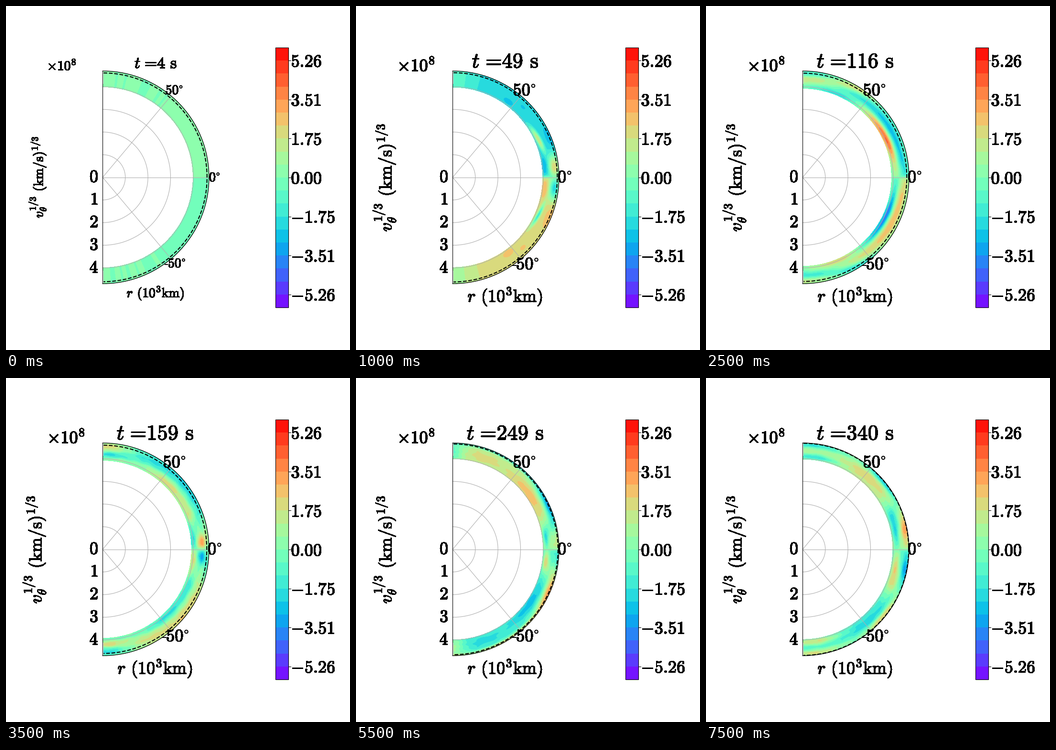
Recreate the animation shown at these times as a matplotlib script. Size 720 by 720 pixels, loop 8000 ms.

```python
import numpy as np
import matplotlib.pyplot as plt
from matplotlib.animation import FuncAnimation
from matplotlib.patches import Circle, Rectangle
from matplotlib.patheffects import withStroke

plt.rcParams["mathtext.fontset"] = "cm"

FRAMES, INTERVAL = 16, 500
CX, CY, R, UNIT = 202.3, 358.6, 222.6, 47.4
VMAX, BANDS = 5.847, 20
LEVELS = np.linspace(-VMAX, VMAX, BANDS + 1)
THIN = 1.1

# dpi 72 makes one point equal one pixel
fig = plt.figure(figsize=(10, 10), dpi=72, facecolor="white")
ax = fig.add_axes([0, 0, 1, 1])
ax.set_xlim(0, 720)
ax.set_ylim(720, 0)
ax.axis("off")

# Shell grid: latitude in degrees, depth 0 (inner edge) to 1 (rim)
lat, S = np.meshgrid(np.linspace(-89.5, 89.5, 480), np.linspace(0, 1, 60))
A = np.abs(lat)
SIDE = np.tanh(lat / 1.3)


def polar(r, deg):
    a = np.radians(deg)
    return CX + r * np.cos(a), CY - r * np.sin(a)


def bump(a, s, da, ds, tilt=0):
    return np.exp(-((A - a) / da) ** 2 - ((S - s - tilt * (A - a)) / ds) ** 2)


def stripe(a, w):
    return np.exp(-((A - a) / w) ** 2)


def filaments(phase):
    return 0.3 * np.sin(0.45 * A + 9 * S + phase) * np.sin(14 * S - 0.2 * A + 2 * phase)


def onset():
    north = 0.25 - 0.5 * (stripe(82, 1) + stripe(77, 1) + stripe(65, 3.5)
                          + stripe(56, 1.3) + stripe(52, 1))
    south = -0.25 + 0.5 * (stripe(89, 4) + stripe(81, 1.6) + stripe(77, 1.2)
                           + stripe(72, 2) + stripe(67, 1.8) + stripe(57, 1.3))
    return np.where(lat > 0, north, south) * np.abs(SIDE)


def inflow():
    v = -2.05 + 1.2 * stripe(90, 13)
    v = v - 0.6 * bump(53.7, 0.25, 4, 0.2) - 0.6 * bump(45, 0.57, 2, 0.12)
    v += 3.8 * bump(24, 0.22, 8, 0.13, -0.01) - 0.6 * bump(22, 0.85, 8, 0.25)
    v += 4.2 * bump(6, 0.75, 7, 0.34) - 1.0 * bump(7, 0.2, 6, 0.2)
    return v * SIDE


def jets():
    v = -3.5 * bump(28, 0.6, 42, 0.27, -0.005) - 1.6 * bump(5, 0.65, 7, 0.3)
    v += 3.0 * bump(90, 0.43, 20, 0.22) + 3.8 * bump(60, 0.85, 17, 0.22, -0.014)
    v += 5.6 * bump(25, 0.16, 24, 0.2, -0.003) - 3.0 * bump(88, 0.85, 15, 0.17)
    v += -3.4 * bump(65, 0.08, 19, 0.15)
    return v * SIDE


def breakup():
    v = -0.7 + 2.9 * bump(88, 0.78, 15, 0.25) - 1.6 * bump(86, 0.35, 9, 0.14)
    v += 1.0 * bump(80, 0.08, 15, 0.12) - 1.2 * bump(62, 0.6, 16, 0.3)
    v += 2.8 * bump(45, 0.2, 20, 0.28) + 1.7 * bump(22, 0.25, 9, 0.25)
    v += -1.5 * bump(35, 0.9, 24, 0.3) - 1.4 * bump(8, 0.15, 9, 0.2)
    v += 3.9 * bump(4, 0.6, 6, 0.28) + 1.8 * bump(12, 0.95, 8, 0.2)
    return (v + filaments(0)) * SIDE


def rebound():
    v = 1.2 - 3.1 * bump(87, 0.25, 5, 0.13) - 3.2 * bump(74, 0.88, 8, 0.14)
    v += 0.8 * bump(72, 0.3, 9, 0.25) - 3.4 * bump(60, 0.48, 6.5, 0.16, -0.01)
    v += 1.7 * bump(30, 0.28, 16, 0.3) - 4.2 * bump(30, 0.9, 24, 0.33)
    v += -4.3 * bump(7, 0.3, 8, 0.25, 0.02) + 3.6 * bump(8, 0.8, 6, 0.25)
    return (v + 0.6 * filaments(1)) * SIDE


def settling():
    v = 1.3 - 2.0 * bump(90, 0.5, 7, 0.8) + 0.8 * bump(72, 0.4, 11, 0.3)
    v += -3.5 * bump(55, 1, 34, 0.14) + 1.5 * bump(36, 0.25, 16, 0.3)
    v += -3.7 * bump(24, 0.85, 13, 0.25) - 3.2 * bump(7, 0.22, 7, 0.2)
    v += 1.0 * bump(5, 0.95, 5, 0.2) - 1.3 * bump(13, 0.5, 6, 0.3)
    return (v + 0.6 * filaments(2)) * SIDE


def late():
    v = 1.1 - 2.9 * bump(84, 0.88, 20, 0.2) - 2.9 * bump(82, 0.18, 15, 0.2)
    v += 1.1 * bump(46, 0.5, 17, 0.4, -0.008) - 3.8 * bump(40, 0.92, 14, 0.22)
    v += -2.8 * bump(20, 0.35, 9, 0.4) - 2.6 * bump(8, 0.25, 9, 0.22)
    v += 2.4 * bump(12, 0.85, 8, 0.22)
    return (v + 0.7 * filaments(3)) * SIDE


# State of the shell at the key steps
KEYS = [0, 2, 4, 7, 9, 11, 15]
SECONDS = [4, 49, 94, 159, 205, 249, 340]
INNER = [189, 188.5, 186, 186, 188.5, 189.3, 188.5]
DASH = [218.5, 219, 218, 218, 219, 220.5, 222]
FIELDS = [f() for f in (onset, inflow, jets, breakup, rebound, settling, late)]


def field(i):
    k = min(np.searchsorted(KEYS, i, side="right") - 1, len(KEYS) - 2)
    w = (i - KEYS[k]) / (KEYS[k + 1] - KEYS[k])
    return (1 - w) * FIELDS[k] + w * FIELDS[k + 1]


def label(x, y, s, size=36.3, **kw):
    return ax.text(x, y, s, size=size, va="baseline", zorder=4, antialiased=False,
                   path_effects=[withStroke(linewidth=0.5, foreground="black")], **kw)


# Polar grid and frame
half = np.linspace(90, -90, 361)
for k in range(1, 5):
    ax.plot(*polar(UNIT * k, half), color="#b0b0b0", lw=THIN, zorder=1.5)
for a in (-50, 0, 50):
    ax.plot(*polar(np.array([0, R]), a), color="#b0b0b0", lw=THIN, zorder=1.5)
ax.plot(*polar(R, half), color="black", lw=1.3, zorder=3)
ax.plot([CX, CX], [CY - R, CY + R], color="black", lw=THIN, zorder=3)
for k in range(5):
    label(193.5, 368.3 + UNIT * k, f"${k}$", ha="right")

# Colour bar
cmap = plt.get_cmap("rainbow")
COLORS = [cmap((k + 0.5) / BANDS) for k in range(BANDS)]
BX, BY, BW, BH = 564.1, 86.9, 27, 544
step = BH / BANDS
for k, c in enumerate(COLORS):
    ax.add_patch(Rectangle((BX, BY), BW, BH - k * step, fc=c, ec="none"))
ax.add_patch(Rectangle((BX, BY), BW, BH, fc="none", ec="black", lw=THIN))
for k in range(1, BANDS, 3):
    y = BY + BH - k * step
    ax.plot([BX + BW, BX + BW + 4.9], [y, y], color="black", lw=THIN)
    label(596.5, y + 13, f"${round(LEVELS[k], 2) + 0.0:.2f}$")

# Labels with a small first layout and a large one afterwards: (x, y, size)
SMALL, LARGE = 27.8, 36.3
title = label(313, 130, "", ha="center")
layouts = [
    (title, (313.5, 130, 33.4), (312.5, 129, 44.4)),
    (label(0, 0, r"$\times 10^8$"), (86, 134, SMALL), (86, 136, LARGE)),
    (label(0, 0, r"$r\hspace{0.38}(10^3\mathrm{km})$", ha="center"),
     (313, 609.5, SMALL), (312, 619, LARGE)),
    (label(0, 0, r"$v_\theta^{1/3}\hspace{0.38}(\mathrm{km/s})^{1/3}$", ha="center",
           rotation=90, rotation_mode="anchor"),
     (77.5, 358, SMALL), (74.5, 359, LARGE + 0.5)),
]

# Angles: digits followed by a small ring
angles = []
for s, first, rest in [("50", (333.5, 184.5), (328.5, 187)),
                       ("0", (425, 367), (422, 369)),
                       ("50", (339, 547), (335, 551))]:
    text = label(0, 0, f"${s}$")
    ring = ax.add_patch(Circle((0, 0), 1, fc="none", ec="black", lw=2, zorder=4))
    layouts.append((text, (*first, SMALL), (*rest, LARGE)))
    angles.append((text, ring, len(s)))
hyphen = ax.add_patch(Rectangle((0, 0), 1, 1, fc="black", ec="none", zorder=4))

dashed, = ax.plot([], [], "--", color="black", lw=2.1, zorder=2)
fill = []


def update(i):
    while fill:
        fill.pop().remove()
    inner = np.interp(i, KEYS, INNER)
    x, y = polar(inner + S * (R - inner), lat)
    fill.append(ax.contourf(x, y, np.clip(field(i), -5.8, 5.8), levels=LEVELS,
                            colors=COLORS, zorder=1))
    dashed.set_data(*polar(np.interp(i, KEYS, DASH), half[1:-1]))

    sec = int(round(np.interp(i, KEYS, SECONDS)))
    title.set_text(rf"$t\hspace{{0.116}}=\hspace{{-0.2}}{sec}\hspace{{0.38}}\mathrm{{s}}$")
    for text, first, rest in layouts:
        px, py, size = rest if i else first
        text.set_position((px, py))
        text.set_fontsize(size)
    for text, ring, digits in angles:
        px, py = text.get_position()
        em = text.get_fontsize()
        ring.set_center((px + (0.5 * digits + 0.17) * em, py - 0.55 * em))
        ring.set_radius(0.09 * em)
    hyphen.set_bounds(px - 0.25 * em, py - 0.245 * em, 0.265 * em, 0.06 * em)
    return []


anim = FuncAnimation(fig, update, frames=FRAMES, init_func=lambda: update(0),
                     interval=INTERVAL, repeat=True, repeat_delay=0, blit=False)
plt.show()
```
